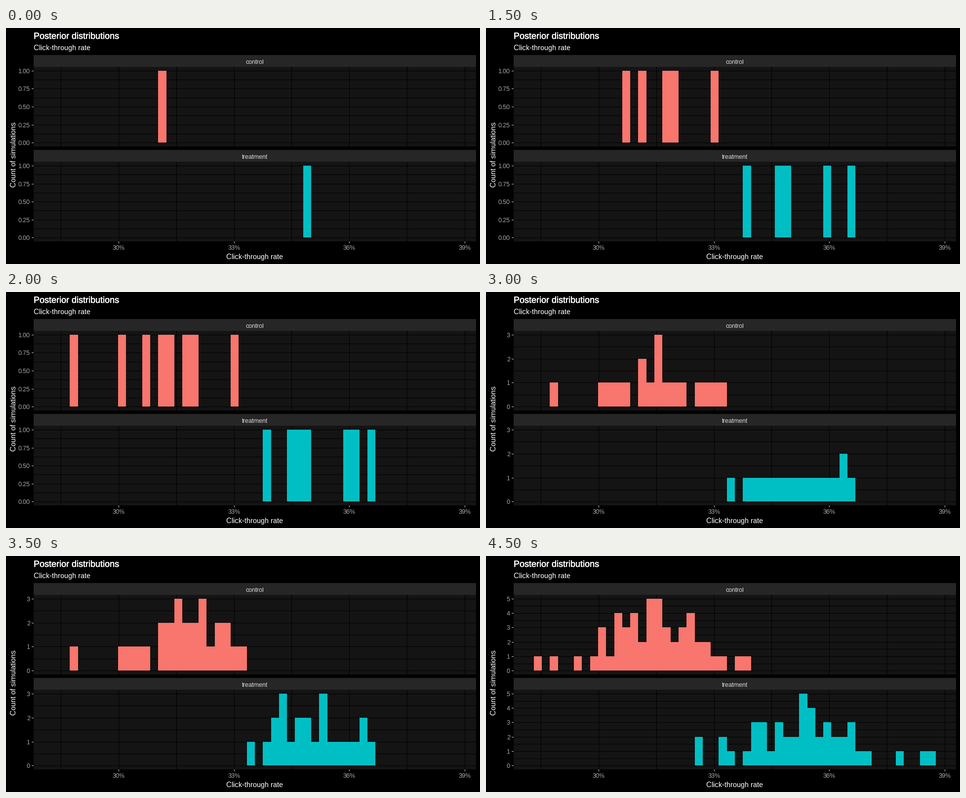
Recreate the animation shown at these times as a matplotlib script. Size 960 by 480 pixels, loop 5 s.

```python
import matplotlib.pyplot as plt
import matplotlib.patheffects as pe
from matplotlib.animation import FuncAnimation
from matplotlib.patches import Rectangle

W, H, DPI = 960, 480, 96
LEFT, RIGHT = 56, 952
BINS = 50
BIN_LEFT, BIN_WIDTH = 96.73, 16.29
PLOT_HEIGHT = 146.5

plt.rcParams.update({
    "font.family": "Liberation Sans",
    "text.hinting": "native",
    "text.hinting_factor": 1,
})

# Histogram bins hit by the new simulations of each step
CONTROL = [
    [13], [], [11, 17], [16, 22], [2, 8, 14], [9, 10, 18, 23],
    [13, 15, 15, 15, 20, 21],
    [14, 16, 17, 18, 18, 19, 20, 21],
    [5, 7, 8, 10, 10, 10, 12, 12, 12, 25],
    [0, 8, 11, 11, 12, 14, 14, 14, 15, 15, 16, 19, 19, 19, 26],
]
TREATMENT = [
    [31], [], [26], [30, 36, 39], [29, 37], [28, 32, 33, 34],
    [24, 27, 35, 38, 38],
    [27, 28, 28, 30, 31, 33, 33],
    [20, 20, 23, 27, 34, 34, 34, 36, 36, 39, 39, 49],
    [23, 30, 32, 33, 33, 35, 37, 40, 41, 45, 48],
]

# name, draws, bar colour, strip top, panel top, panel bottom, zero line
PANELS = [
    ("control", CONTROL, "#F8766D", 55, 79, 241, 233.3),
    ("treatment", TREATMENT, "#00BFC4", 248, 272, 434, 426.4),
]

fig = plt.figure(figsize=(W / DPI, H / DPI), dpi=DPI, facecolor="black")
ax = fig.add_axes([0, 0, 1, 1])


def box(x0, y0, x1, y1, color, z=1):
    ax.add_patch(Rectangle((x0, y0), x1 - x0, y1 - y0, fc=color, lw=0,
                           antialiased=False, zorder=z))


def label(x, y, text, px, color="white", ha="center", **kw):
    return ax.text(x, y, text, size=px * 72 / DPI, color=color, ha=ha,
                   va="baseline", zorder=5, **kw)


def hline(x0, x1, y, color):
    y = round(y)
    box(x0, y, x1, y + 1, color, 2)


def vline(x, y0, y1, color):
    x = round(x)
    box(x, y0, x + 1, y1, color, 2)


def bin_edge(k):
    return round(BIN_LEFT + BIN_WIDTH * k)


def percent_x(p):
    return 228 + (p - 30) * 701 / 9


def count_bins(draws, step):
    counts = [0] * BINS
    for new in draws[:step + 1]:
        for k in new:
            counts[k] += 1
    return counts


def draw_panel(panel, counts, top_count):
    name, _, color, strip, top, bottom, zero = panel
    box(LEFT, strip, RIGHT, top, "#262626")
    box(LEFT, top, RIGHT, bottom, "#141414")
    label(503.5, strip + 18, name, 12, "#E5E5E5")

    for i in range(8):
        vline(percent_x(28.5 + 1.5 * i), top, bottom, "black")

    def y_at(value):
        return zero - PLOT_HEIGHT * value / top_count

    gap = 0.25 if top_count == 1 else 1
    for i in range(round(2 * top_count / gap) + 1):
        value = i * gap / 2
        y = y_at(value)
        hline(LEFT, RIGHT, y, "black")
        if i % 2 == 0:
            hline(LEFT - 4, LEFT, y, "#CCCCCC")
            text = f"{value:.2f}" if gap < 1 else f"{value:.0f}"
            label(49, round(y) + 5, text, 12, "#B2B2B2", ha="right")

    for k, n in enumerate(counts):
        if n:
            box(bin_edge(k), round(y_at(n)), bin_edge(k + 1), round(zero),
                color, 3)


def draw(step):
    ax.clear()
    ax.set(xlim=(0, W), ylim=(H, 0))
    ax.axis("off")

    title = label(LEFT, 22, "Posterior distributions", 18, ha="left")
    title.set_path_effects([pe.withStroke(linewidth=0.4, foreground="white")])
    label(LEFT, 45, "Click-through rate", 15, ha="left")
    label(503.5, 470, "Click-through rate", 15)
    label(20, 257.5, "Count of simulations", 15, rotation=90,
          rotation_mode="anchor")

    histograms = [count_bins(panel[1], step) for panel in PANELS]
    top_count = max(map(max, histograms))
    for panel, counts in zip(PANELS, histograms):
        draw_panel(panel, counts, top_count)

    for p in (30, 33, 36, 39):
        vline(percent_x(p), 434, 438, "#CCCCCC")
        label(percent_x(p), 451, f"{p}%", 12, "#B2B2B2")
    return []


anim = FuncAnimation(fig, draw, frames=10, interval=500, repeat=True,
                     repeat_delay=0, init_func=lambda: draw(0))
plt.show()
```
